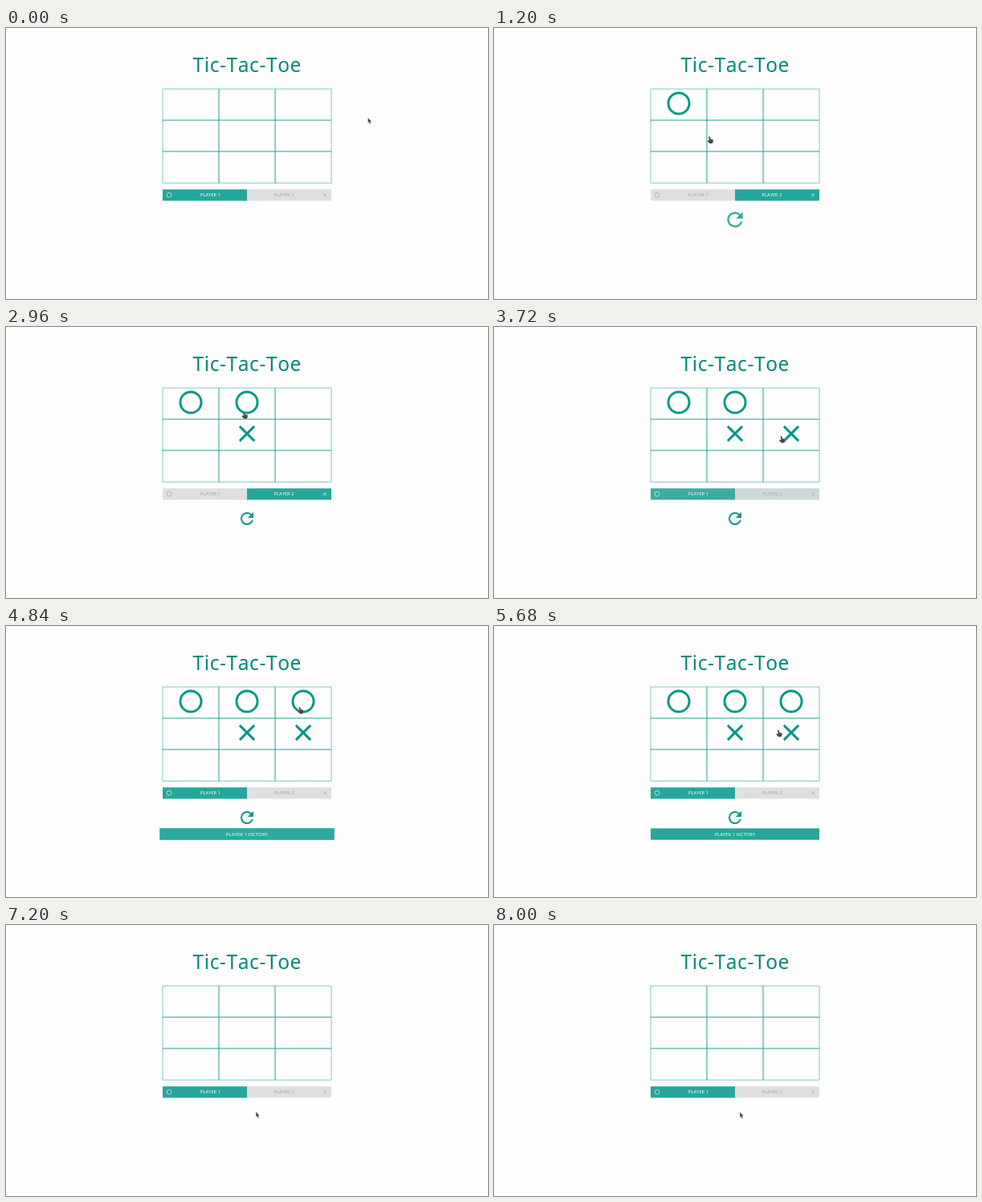
An HTML page for the animation above (8.04 s loop, 600 by 338 pixels).

```html
<!DOCTYPE html>
<html lang="en">
<head>
<meta charset="utf-8">
<title>Tic-Tac-Toe</title>
<style>
  html, body { margin: 0; width: 100%; height: 100%; overflow: hidden; background: #fdfdfd; }
  svg { display: block; width: 100%; height: 100%; }
  text { font: 5.5px "Noto Sans", sans-serif; letter-spacing: .15px; text-anchor: middle; font-kerning: none; }
  #title { font-size: 24.5px; letter-spacing: .6px; fill: #00897b; }
  #banner { filter: drop-shadow(0 .5px .4px rgba(0, 0, 0, .25)); }
  .line { fill: none; stroke: #009688; }
</style>
</head>
<body>
<svg viewBox="0 0 600 338">
  <defs>
    <!-- icons on a 24 unit box, centred on the origin -->
    <circle id="O" r="9" fill="none" stroke="currentColor" stroke-width="2"/>
    <path id="X" d="M-6.3-6.3 6.3 6.3M6.3-6.3-6.3 6.3" fill="none" stroke="currentColor" stroke-width="2"/>
  </defs>
  <text id="title" x="300.3" y="54.5">Tic-Tac-Toe</text>
  <path class="line" stroke-width=".5" d="M195 76H405V193.3H195Z"/>
  <path class="line" stroke-width=".88" d="M265 76V193.3M335 76V193.3M195 115H405M195 154H405"/>
  <g id="marks" color="#009688"></g>
  <g id="tabs"></g>
  <g id="refresh">
    <path transform="translate(-12 -12)" fill="#009688" d="M17.65 6.35A7.96 7.96 0 0 0 12 4a8 8 0 1 0 7.73 10h-2.08A6 6 0 1 1 12 6c1.66 0 3.14.69 4.22 1.78L13 11h7V4z"/>
  </g>
  <g id="banner">
    <rect x="-105" y="-7.1" width="210" height="14.2" rx=".6" fill="#26a69a"/>
    <text y="2" fill="#fff">PLAYER 1 VICTORY</text>
  </g>
  <g id="cursor" fill="#484848" stroke="#fff" stroke-opacity=".5" stroke-width=".3">
    <path id="arrow" d="M0 0 .2 6.4 1.6 5.3 2.7 7.9 3.9 7.3 2.8 4.9 4.6 4.6Z"/>
    <path id="hand" d="M-1 .8A1 1 0 0 1 .9 .5L1.6 3 5 4 4.6 7 3.8 8.6H.2L-2.6 5.4-1.9 4.3-.1 5Z"/>
  </g>
</svg>
<script>
const LOOP = 8040, RESET = 6440;
const $ = id => document.getElementById(id);
const clamp = v => Math.min(1, Math.max(0, v));
const mix = (a, b, k) => a + (b - a) * k;
const mixColor = (a, b, k) => `rgb(${a.map((v, i) => Math.round(mix(v, b[i], k)))})`;
const smooth = k => k * k * (3 - 2 * k);

// cubic-bezier(.25, .1, .25, 1)
function ease(x) {
  if (x <= 0 || x >= 1) return clamp(x);
  const bezier = (p, q, u) => 3 * p * u * (1 - u) ** 2 + 3 * q * u * u * (1 - u) + u ** 3;
  let low = 0, high = 1;
  for (let i = 0; i < 20; i++) {
    const mid = (low + high) / 2;
    if (bezier(.25, .25, mid) < x) low = mid; else high = mid;
  }
  return bezier(.1, 1, low);
}
const progress = (t, start, duration) => ease((t - start) / duration);

const moves = [
  { at: 920, icon: 'O', col: 0, row: 0 },
  { at: 1800, icon: 'X', col: 1, row: 1 },
  { at: 2560, icon: 'O', col: 1, row: 0 },
  { at: 3540, icon: 'X', col: 2, row: 1 },
  { at: 4400, icon: 'O', col: 2, row: 0 }
];
const turnChanges = moves.slice(0, 4).map(move => move.at);

// start, end, target x, target y, downward bow
const path = [
  [200, 680, 225, 110, 14],
  [960, 1360, 291, 138, 8],
  [2040, 2400, 296, 106, 0],
  [3120, 3440, 357.5, 136, 0],
  [3960, 4240, 365.5, 101, 0],
  [5440, 6240, 311.5, 233, 0],
  [7120, 7560, 306, 233.5, 0]
];

$('marks').innerHTML = moves.map(({ icon, col, row }) =>
  `<use href="#${icon}" transform="translate(${230 + 70 * col} ${94 + 39 * row}) scale(1.45)"/>`).join('');
$('tabs').innerHTML = [[195, 203, 'O'], [300, 397, 'X']].map(([x, iconX, icon], i) =>
  `<g><rect x="${x}" y="201.3" width="105" height="14.2"/>
   <text x="${x + (i ? 46 : 59.5)}" y="210.3" fill="currentColor">PLAYER ${i + 1}</text>
   <use href="#${icon}" transform="translate(${iconX} 208.3) scale(.32)"/></g>`).join('');

function cursorAt(t) {
  let x = 450.5, y = 112;
  for (const [start, end, toX, toY, bow] of path) {
    const k = smooth(clamp((t - start) / (end - start)));
    x = mix(x, toX, k);
    y = mix(y, toY, k) + bow * Math.sin(Math.PI * k);
  }
  return [x, y];
}

// Zooms in from double size, later grows and fades away.
function showOverlay(node, t, start, x, y) {
  const enter = progress(t, start, 500), leave = progress(t, RESET, 500);
  node.setAttribute('transform', `translate(${x} ${y}) scale(${2 - enter + leave / 2})`);
  node.setAttribute('opacity', enter * (1 - leave));
}

function render(t) {
  const cleared = progress(t, RESET, 400);
  [...$('marks').children].forEach((mark, i) =>
    mark.setAttribute('opacity', progress(t, moves[i].at, 200) * (1 - cleared)));

  const second = turnChanges.reduce((sum, at, i) => sum + (i % 2 ? -1 : 1) * progress(t, at, 300), 0);
  [...$('tabs').children].forEach((tab, i) => {
    const active = i ? second : 1 - second;
    tab.firstChild.setAttribute('fill', mixColor([223, 223, 223], [38, 166, 154], active));
    tab.setAttribute('color', mixColor([164, 164, 164], [255, 255, 255], active));
  });

  showOverlay($('refresh'), t, 960, 300, 239);
  showOverlay($('banner'), t, 4460, 300, 259.5);

  const [x, y] = cursorAt(t);
  const onBoard = x > 195 && x < 405 && y > 76 && y < 193;
  const onRefresh = t < RESET + 500 && x > 288 && x < 312 && y > 227 && y < 251;
  const pointing = onBoard || onRefresh;
  $('cursor').setAttribute('transform', `translate(${x} ${y})`);
  $('hand').setAttribute('visibility', pointing ? 'visible' : 'hidden');
  $('arrow').setAttribute('visibility', pointing ? 'hidden' : 'visible');
}

const begin = performance.now();
function frame() {
  render((performance.now() - begin) % LOOP);
  requestAnimationFrame(frame);
}
frame();
</script>
</body>
</html>
```
